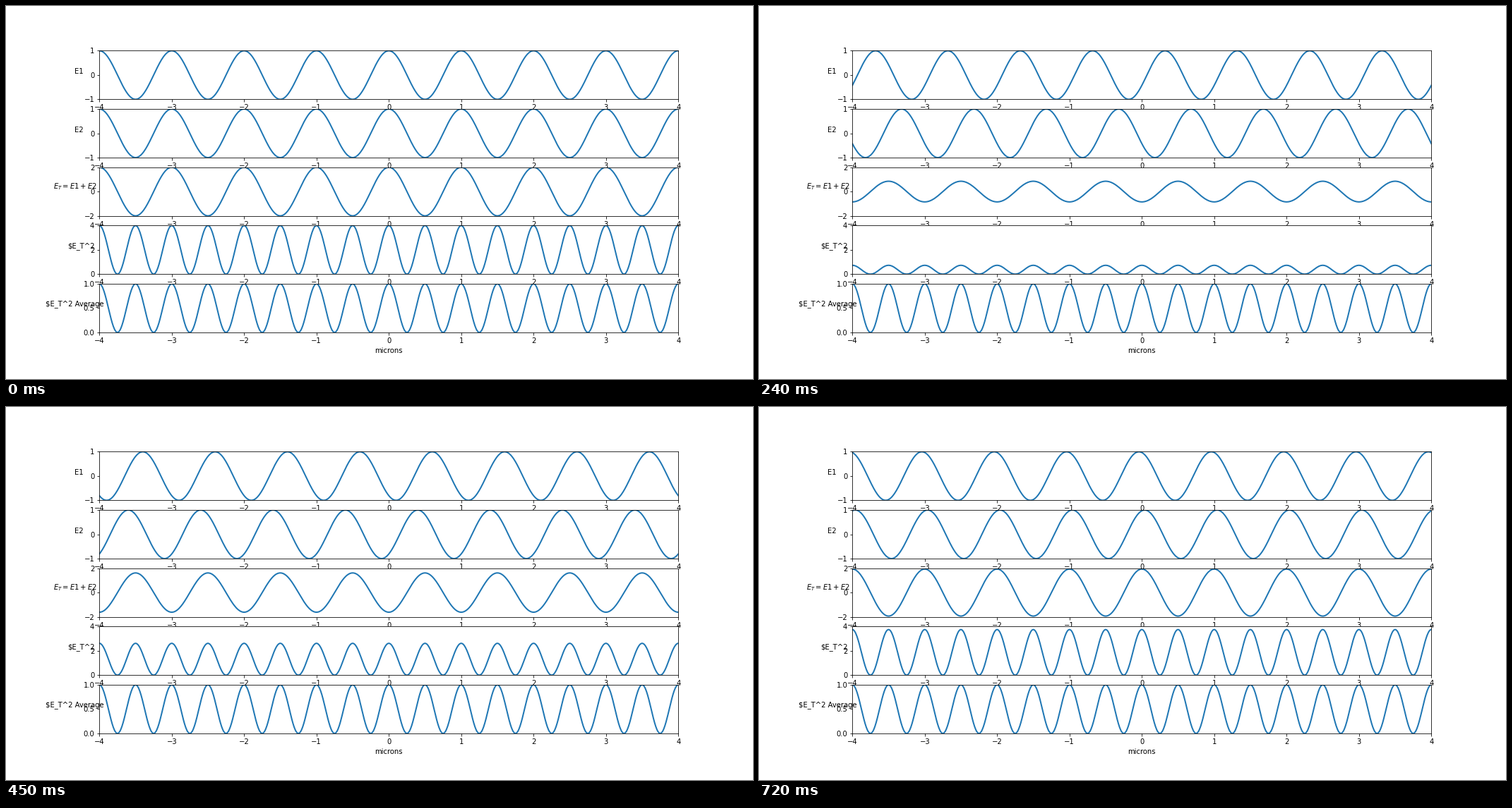
Animation of 1058 by 529 pixels, one loop 0.75 s. Source, as a matplotlib script:

```python
import numpy as np
import matplotlib.pyplot as plt
from matplotlib.animation import FuncAnimation

W, H, DPI = 1058, 529, 72
FRAMES, INTERVAL = 25, 30
LEFT, RIGHT = 0.125, 0.9

plt.rcParams.update({"font.family": "DejaVu Sans", "font.size": 10})

# label, y ticks, horizontal centre of the label in pixels
PANELS = [
    ("E1", [-1, 0, 1], 103),
    ("E2", [-1, 0, 1], 103),
    ("$E_T = E1 + E2$", [-2, 0, 2], 98),
    ("$E_T^2", [0, 2, 4], 106.5),
    ("$E_T^2 Average", [0, 0.5, 1], 97),
]

# the small excess keeps the pixel size from rounding down
fig, axes = plt.subplots(
    len(PANELS), 1, figsize=((W + 0.01) / DPI, (H + 0.01) / DPI), dpi=DPI
)
fig.subplots_adjust(left=LEFT, right=RIGHT, bottom=0.125, top=0.88, hspace=0.2)

x = np.linspace(-4, 4, 1000)
lines = []
for ax, (label, ticks, centre) in zip(axes, PANELS):
    ax.set(xlim=(-4, 4), ylim=(ticks[0], ticks[-1]),
           xticks=range(-4, 5), yticks=ticks)
    ax.set_ylabel(label, rotation=0)
    ax.yaxis.set_label_coords((centre / W - LEFT) / (RIGHT - LEFT), 0.5)
    lines.append(ax.plot([], [], lw=2, color="#1f77b4")[0])
axes[-1].set_xlabel("microns")


def update(frame):
    shift = frame / FRAMES
    right_going = np.cos(2 * np.pi * (x - shift))
    left_going = np.cos(2 * np.pi * (x + shift))
    total = right_going + left_going
    average = np.cos(2 * np.pi * x) ** 2
    waves = (right_going, left_going, total, total ** 2, average)
    for line, wave in zip(lines, waves):
        line.set_data(x, wave)
    return lines


anim = FuncAnimation(fig, update, frames=FRAMES, interval=INTERVAL,
                     repeat=True, repeat_delay=0, blit=False)
plt.show()
```
